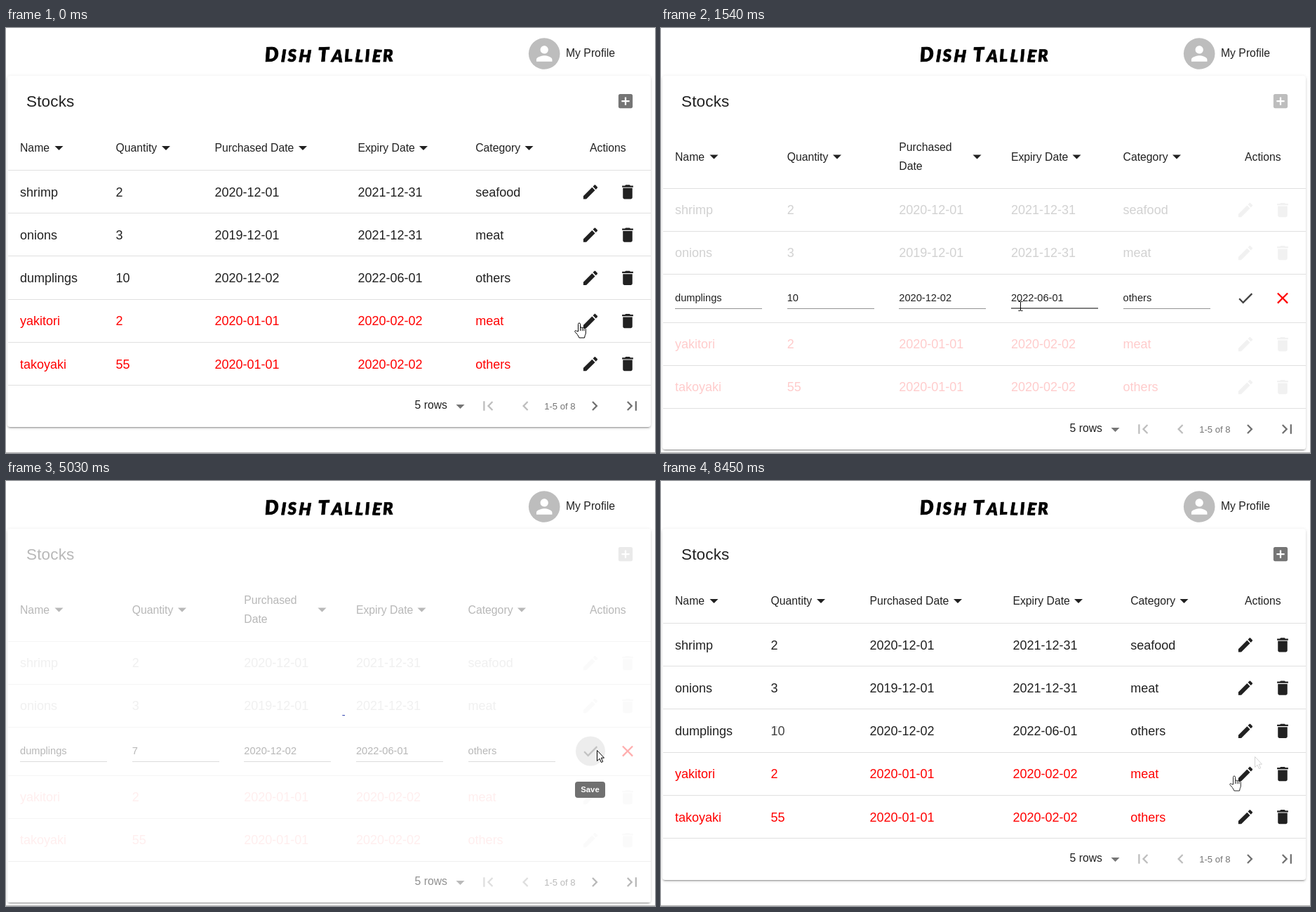
Recreate the animation shown at these times as an HTML page. Size 925 by 605 pixels, loop 8520 ms.

```html
<!DOCTYPE html>
<html lang="en">
<head>
<meta charset="utf-8">
<title>Dish Tallier</title>
<style>
  html, body { margin: 0; width: 100%; height: 100%; overflow: hidden; background: #fff; }
  svg { display: block; position: absolute; inset: 0; }
  text { font-family: "Liberation Sans", Arial, sans-serif; font-size: 18px; fill: #212121; white-space: pre; }
  .title { font: italic 900 28px Lato, sans-serif; letter-spacing: 2.8px; fill: #000; stroke: #000; stroke-width: .7; stroke-linejoin: round; }
  .title tspan { font-size: 24px; }
  .h6 { font-size: 22.5px; letter-spacing: .0075em; }
  .head { font-size: 15.75px; }
  .input { font-size: 14.625px; }
  .hint { fill: #b5b5b5; }
  .caption { font-size: 13.1px; fill: #757575; }
  .late text { fill: #f00; }
  .tip rect { fill: rgba(97, 97, 97, .9); }
  .tip text { font-size: 11.25px; font-weight: 700; fill: #fff; text-anchor: middle; }
  .card { position: absolute; left: 2px; top: 68px; width: 917px; border-radius: 4px; background: #fff;
    box-shadow: 0 3px 1px -2px rgba(0,0,0,.2), 0 2px 2px rgba(0,0,0,.14), 0 1px 5px rgba(0,0,0,.12); }
  .cursor path { fill: #fff; stroke: #000; stroke-linejoin: round; }
  .cursor .line { fill: none; }
</style>
</head>
<body>
<div class="card" id="card"></div>
<svg id="stage" width="925" height="605" viewBox="0 0 925 605"></svg>
<script>
const LOOP = 8520, EDIT = 1030, SAVED = 5970, REWIND = 8160;
const ACTION_X = [833, 886];
const VIEW_X = [20, 156.5, 297.4, 501.4, 669.2];
const EDIT_X = [20, 179.65, 339.3, 498.95, 658.6];
const HEADS = ['Name', 'Quantity', 'Purchased Date', 'Expiry Date', 'Category'];
const ROWS = [
  ['shrimp', '2', '2020-12-01', '2021-12-31', 'seafood'],
  ['onions', '3', '2019-12-01', '2021-12-31', 'meat'],
  ['dumplings', '10', '2020-12-02', '2022-06-01', 'others'],
  ['yakitori', '2', '2020-01-01', '2020-02-02', 'meat'],
  ['takoyaki', '55', '2020-01-01', '2020-02-02', 'others']
];
const ICONS = {
  edit: 'M3 17.25V21h3.75L17.81 9.94l-3.75-3.75L3 17.25zM20.71 7.04c.39-.39.39-1.02 0-1.41l-2.34-2.34c-.39-.39-1.02-.39-1.41 0l-1.83 1.83 3.75 3.75 1.83-1.83z',
  bin: 'M6 19c0 1.1.9 2 2 2h8c1.1 0 2-.9 2-2V7H6v12zM19 4h-3.5l-1-1h-5l-1 1H5v2h14V4z',
  check: 'M9 16.17L4.83 12l-1.42 1.41L9 19 21 7l-1.41-1.41z',
  close: 'M19 6.41L17.59 5 12 10.59 6.41 5 5 6.41 10.59 12 5 17.59 6.41 19 12 13.41 17.59 19 19 17.59 13.41 12z',
  add: 'M19 3H5c-1.11 0-2 .9-2 2v14c0 1.1.89 2 2 2h14c1.1 0 2-.9 2-2V5c0-1.1-.9-2-2-2zm-2 10h-4v4h-2v-4H7v-2h4V7h2v4h4v2z',
  first: 'M18.41 16.59L13.82 12l4.59-4.59L17 6l-6 6 6 6zM6 6h2v12H6z',
  prev: 'M15.41 7.41L14 6l-6 6 6 6 1.41-1.41L10.83 12z',
  next: 'M10 6L8.59 7.41 13.17 12l-4.58 4.59L10 18l6-6z',
  last: 'M5.59 7.41L10.18 12l-4.59 4.59L7 18l6-6-6-6zM16 6h2v12h-2z',
  person: 'M12 12c2.21 0 4-1.79 4-4s-1.79-4-4-4-4 1.79-4 4 1.79 4 4 4zm0 2c-2.67 0-8 1.34-8 4v2h16v-2c0-2.66-5.33-4-8-4z'
};

const text = (x, y, s, cls = '', id = '') => `<text x="${x}" y="${Math.round(y)}" class="${cls}" id="${id}">${s}</text>`;
const icon = (name, x, y, fill, size = 27) =>
  `<path d="${ICONS[name]}" fill="${fill}" transform="translate(${x} ${y}) scale(${size / 24}) translate(-12 -12)"/>`;
const arrow = (x, y, fill = '#212121') => `<path d="M${x - 6} ${y - 3}h12l-6 6z" fill="${fill}"/>`;
const rule = y => `<rect x="3" y="${y}" width="916" height="1" fill="#e0e0e0"/>`;
const tip = (id, label, y, w) =>
  `<g class="tip" id="${id}"><rect x="${832.5 - w / 2}" y="${y}" width="${w}" height="23" rx="4"/>${text(832.5, y + 15, label)}</g>`;

function row(i, xs, y, fill) {
  const base = y + 6.3;
  const cells = ROWS[i].map((s, c) => text(xs[c], base, s, '', i == 2 && c == 1 ? 'oldQty' : '')).join('');
  const extra = i == 2 ? text(xs[1], base, '7', '', 'newQty') : '';
  return `<g class="${i == 2 ? '' : 'dim'}${i > 2 ? ' late' : ''}">${cells}${extra}` +
    icon('edit', ACTION_X[0], y, fill) + icon('bin', ACTION_X[1], y, fill) + '</g>';
}

const footer = y => text(582.6, y + 4, '5 rows', 'head') + arrow(647.5, y + 1, '#757575') +
  icon('first', 687, y, '#bdbdbd') + icon('prev', 740.5, y, '#bdbdbd') + text(767.2, y + 5, '1-5 of 8', 'caption') +
  icon('next', 839, y, '#707070') + icon('last', 892.2, y, '#707070');

function viewTable() {
  const marks = [75.5, 228, 423, 595, 745.5];
  return icon('add', 883, 104, '#757575') +
    HEADS.map((s, c) => text(VIEW_X[c], 176, s, 'head') + arrow(marks[c], 171)).join('') +
    text(832, 176, 'Actions', 'head') +
    [202, 263, 324, 386, 447, 508].map(rule).join('') +
    ROWS.map((_, i) => row(i, VIEW_X, 233.4 + 61.2 * i, '#212121')).join('') + footer(538);
}

function editTable() {
  const marks = [75.5, 251, 450.5, 592.5, 735];
  const heads = HEADS.map((s, c) => (c == 2
    ? text(EDIT_X[c], 175, 'Purchased', 'head') + text(EDIT_X[c], 202, 'Date', 'head')
    : text(EDIT_X[c], 189, s, 'head')) + arrow(marks[c], 183.5)).join('');
  const inputs = ROWS[2].map((s, c) => text(EDIT_X[c], 389, s, 'input', 'in' + c) +
    `<rect class="under" x="${Math.round(EDIT_X[c])}" width="124"/>`).join('');
  return icon('add', 883, 104, '#bdbdbd') + heads + text(832, 189, 'Actions', 'head') +
    [228, 289, 350, 419, 480, 541].map(rule).join('') +
    [[0, 259], [1, 320], [3, 450], [4, 511]].map(([i, y]) => row(i, EDIT_X, y, '#bdbdbd')).join('') +
    inputs + text(EDIT_X[1], 389, 'Quantity', 'input hint', 'hint') +
    '<rect id="focus" y="398" height="2" fill="#3f51b5"/><rect id="caret" y="376" width="1" height="16"/>' +
    `<circle id="ripple" cx="833" cy="384.5" r="21"/>` +
    icon('check', 833, 384.5, '#424242') + icon('close', 886, 384.5, '#f00') + footer(571);
}

const $ = id => document.getElementById(id);
$('stage').innerHTML =
  `<text class="title" x="462" y="48" text-anchor="middle" rotate="-3 2 -2 3 0 -2 3 -3 2 -2 3 -2">D<tspan>ISH</tspan> T<tspan>ALLIER</tspan></text>
  <circle cx="767.2" cy="36.5" r="22.3" fill="#bdbdbd"/>${icon('person', 767.2, 36.5, '#fff', 33.75)}
  ${text(798, 41, 'My Profile', 'head')}${text(29, 112, 'Stocks', 'h6')}
  <rect y="604" width="925" height="1" fill="#b0b0b0"/>
  <g id="view">${viewTable()}</g><g id="editor">${editTable()}</g>
  <g id="busy"><rect x="2" y="68" width="917" height="473" fill="#fff" opacity=".68"/>
    <rect x="2" y="541" width="917" height="59" fill="#fff" opacity=".5"/>
    <circle id="spin" r="20.2" fill="none" stroke="#3f51b5" stroke-width="3.6"/></g>
  ${tip('editTip', 'Edit', 399, 37)}${tip('saveTip', 'Save', 428, 43)}
  <g class="cursor" id="beam"><path class="line" d="M-3-6.5h2L0-6 1-6.5h2M0-6V6M-3 6.5h2L0 6l1 .5h2"/></g>
  <g class="cursor" id="point"><path d="M.5.5V15.5L4 12.2 6.4 17.5 8.7 16.6 6.3 11.2H10.5Z"/></g>
  <g class="cursor" id="hand"><path d="M-1.5 12V1.5Q-1.5 0 0 0T1.5 1.5V7q0-1 1.3-1t1.4 1.2q0-.8 1.2-.8t1.4 1.3q.2-.7 1.2-.6 1.3.2 1.3 1.6V14q0 2-1 3.5L7.5 21H0l-2.5-4.5L-6 12.5q-.6-1.5.6-1.8 1 0 2 .8z"/>
    <path class="line" d="M1.5 7v4M4.2 7.2v4M6.8 7.8v3.4"/></g>`;

// time, x, y, shape until the next key
const MOVES = [
  [0, 817, 420, 'hand'], [80, 817, 420, 'hand'], [160, 807, 407, 'point'], [300, 802, 388, 'point'],
  [430, 813, 364, 'hand'], [630, 826, 349, 'hand'], [1029, 826, 349, 'hand'], [1030, 825, 353, 'point'],
  [1090, 825, 353, 'point'], [1250, 745, 368, 'point'], [1330, 690, 380, 'beam'], [1540, 513, 396, 'beam'],
  [1700, 425, 399, 'beam'], [1860, 345, 398, 'beam'], [2150, 285, 392, 'beam'], [2400, 279, 390, 'beam'],
  [3590, 279, 390, 'beam'], [3750, 330, 404, 'point'], [3950, 480, 424, 'point'], [4180, 690, 417, 'point'],
  [4410, 828, 392, 'hand'], [4570, 842, 383, 'hand'], [4950, 842, 383, 'point'], [8159, 842, 383, 'point'],
  [8160, 846, 392, 'point'], [LOOP, 846, 392, 'point']
];

const clamp = x => Math.max(0, Math.min(1, x));
const smooth = x => x * x * (3 - 2 * x);
const ease = x => smooth(1 - (1 - clamp(x)) ** 2);
const within = (t, a, b) => t >= a && t < b;
const show = (id, on) => $(id).style.display = on ? '' : 'none';

// linear value of [time, ...values] keys
function track(t, keys, n = 1) {
  if (t <= keys[0][0]) return keys[0][n];
  const i = keys.findIndex(k => k[0] > t);
  if (i < 0) return keys[keys.length - 1][n];
  const a = keys[i - 1], b = keys[i];
  return a[n] + (b[n] - a[n]) * (t - a[0]) / (b[0] - a[0]);
}

function place(id, x, y, alpha) {
  show(id, alpha > 0);
  $(id).setAttribute('transform', `translate(${x} ${y})`);
  $(id).setAttribute('opacity', alpha);
}

function drawCursor(t, mix) {
  const x = track(t, MOVES, 1), y = track(t, MOVES, 2);
  const shape = MOVES.filter(k => k[0] <= t).pop()[3];
  for (const id of ['beam', 'point', 'hand']) place(id, x, y, id == shape ? 1 - mix : 0);
  if (mix) place('hand', 817, 420, mix);
  document.querySelectorAll('.under').forEach((el, c) => {
    const hover = shape == 'beam' && x >= EDIT_X[c] && x <= EDIT_X[c] + 124 && y > 370;
    el.setAttribute('y', hover ? 398 : 399);
    el.setAttribute('height', hover ? 2 : 1);
    el.setAttribute('fill', hover ? '#808080' : '#949494');
  });
}

function drawField(t) {
  $('in1').textContent = t < 2870 ? '10' : t < 3030 ? '1' : t < 3320 ? '' : '7';
  show('hint', within(t, 3030, 3320));
  show('caret', within(t, 2190, 2720) || within(t, 3240, 3780) || within(t, 4310, 4780));
  $('caret').setAttribute('x', t < 2870 ? 195 : t < 3320 ? 180 : 188);
  const w = 124 * ease(track(t, [[2190, 0], [2390, 1], [4780, 1], [4950, 0]]));
  $('focus').setAttribute('x', 242 - w / 2);
  $('focus').setAttribute('width', w);
  $('ripple').setAttribute('opacity', track(t, [[4410, 0], [4500, .04], [4800, .04], [4950, .22], [5050, .22], [5700, 0]]));
}

function drawSpinner(t) {
  show('busy', within(t, 4950, SAVED));
  show('spin', t >= 5020);
  const p = Math.max(0, t - 5030) % 1400 / 1400;
  const grow = smooth(clamp(p * 2)), slide = smooth(clamp(p * 2 - 1));
  $('spin').setAttribute('stroke-dasharray', `${1 + 99 * grow} 200`);
  $('spin').setAttribute('stroke-dashoffset', -15 * grow - 110 * slide);
  $('spin').setAttribute('transform', `translate(460.5 333) scale(1.0227) rotate(${360 * p})`);
}

function render(t) {
  const editing = within(t, EDIT, SAVED);
  const mix = t < REWIND ? 0 : Math.min(5, Math.floor((t - REWIND) / 72) + 1) / 6;
  show('view', !editing);
  show('editor', editing);
  $('card').style.height = (editing ? 532 : 500) + 'px';
  const dim = t < SAVED ? 1 - .8 * ease((t - 1060) / 300) : .2 + .8 * ease((t - SAVED) / 300);
  document.querySelectorAll('.dim').forEach(el => el.setAttribute('opacity', dim));
  $('oldQty').setAttribute('opacity', t < SAVED ? 1 : mix);
  $('newQty').setAttribute('opacity', t < SAVED ? 0 : 1 - mix);
  $('editTip').setAttribute('opacity', editing ? 0 : track(t, [[500, 0], [630, 1], [1029, 1], [1030, 0]]));
  $('saveTip').setAttribute('opacity', track(t, [[4600, 0], [4780, 1], [5080, 1], [5280, 0]]));
  drawField(t);
  drawSpinner(t);
  drawCursor(t, mix);
}

const start = performance.now();
function tick() {
  render((performance.now() - start) % LOOP);
  requestAnimationFrame(tick);
}
tick();
</script>
</body>
</html>
```
